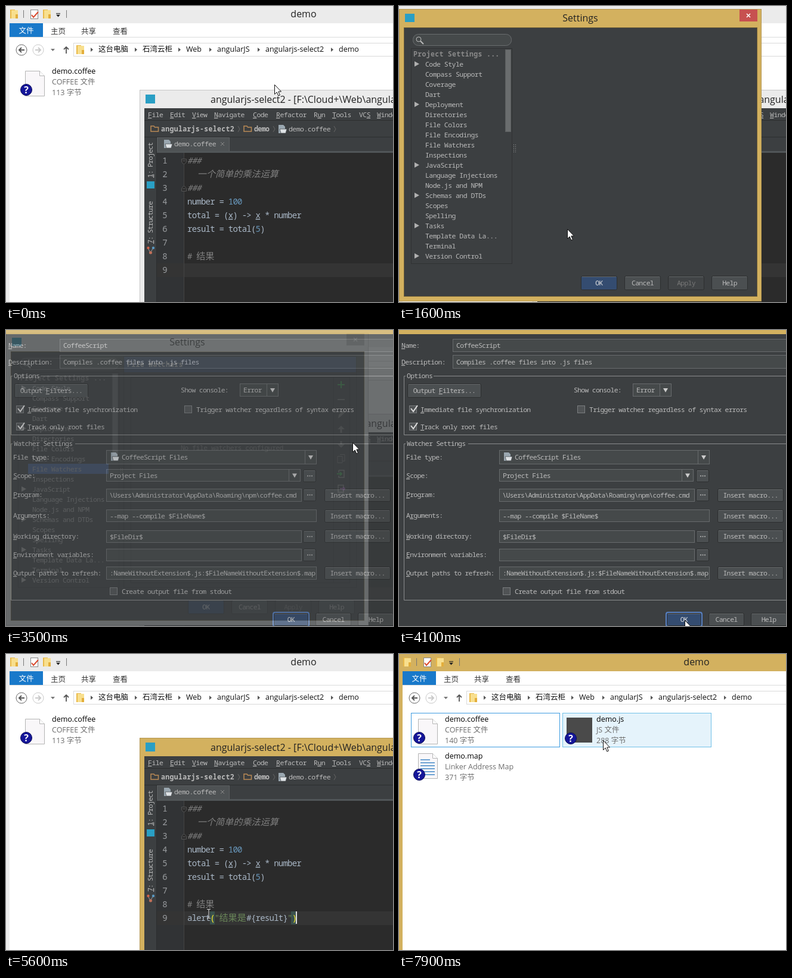
An HTML page that plays this animation: 649x498 px, repeating every 8000 ms.

```html
<!DOCTYPE html>
<html lang="zh">
<head>
<meta charset="utf-8">
<title>demo</title>
<style>
html, body { margin: 0; width: 100%; height: 100%; overflow: hidden; background: #fff }
svg { display: block; width: 649px; height: 498px; user-select: none }
.ui { font: 12.5px "Open Sans", "Noto Sans CJK SC", sans-serif }
.title { font: 16px "Open Sans", sans-serif }
.ide, .wide, .bold, .side { font: 11.5px "Noto Sans Mono", monospace; letter-spacing: -.75px }
.wide { letter-spacing: -.53px }
.side { letter-spacing: -1px }
.bold { font-weight: bold; letter-spacing: .33px }
.key { font-weight: bold }
.code { font: 14px "Noto Sans Mono", monospace; letter-spacing: -.76px }
.han { font: 15.1px "Noto Sans CJK SC", sans-serif }
.italic { font-style: italic }
.u { text-decoration: underline }
</style>
</head>
<body>
<svg id="stage" viewBox="0 0 649 498"></svg>
<script>
const GOLD = '#d3b15f', PALE = '#ebebeb', PANEL = '#3c3f41', FG = '#bbbbbb', DIM = '#777777', BLUE = '#4b6eaf';

const rect = (x, y, w, h, fill, stroke, rx = 0) => {
  const o = stroke ? .5 : 0;
  return `<rect x="${x + o}" y="${y + o}" width="${w - 2 * o}" height="${h - 2 * o}" rx="${rx}" fill="${fill}" stroke="${stroke || 'none'}"/>`;
};
const path = (d, stroke, width = 1, fill = 'none') => `<path d="${d}" fill="${fill}" stroke="${stroke}" stroke-width="${width}"/>`;
const shape = (d, fill) => path(d, 'none', 0, fill);
const disc = (x, y, r, fill, stroke = 'none') => `<circle cx="${x}" cy="${y}" r="${r}" fill="${fill}" stroke="${stroke}"/>`;
// An underscore underlines the character after it.
const text = (x, y, s, fill = FG, cls = 'ide', more = '') => {
  const body = s.replace(/&/g, '&amp;').replace(/</g, '&lt;').replace(/_(.)/g, '<tspan class="u">$1</tspan>');
  return `<text x="${x}" y="${y}" fill="${fill}" class="${cls}" ${more}>${body}</text>`;
};
const middle = 'text-anchor="middle"', end = 'text-anchor="end"';
const layer = (id, ...parts) => `<g id="${id}">${parts.flat().join('')}</g>`;

// File manager
const folder = (x, y) => rect(x, y, 8, 15, '#e9b948') + rect(x + 2, y + 1, 11, 14, '#f8df8e') + rect(x + 9, y + 8, 4, 7, '#e3ae3c');
const page = (x, y) => path(`M${x}.5 ${y}.5h24l8 8v34h-32z`, '#b4b4b4', 1, '#f9f7f9') + path(`M${x + 24}.5 ${y}.5v8h8`, '#b4b4b4', 1, '#fff');
const badge = (x, y) => disc(x, y, 9.5, '#15169a', '#0a0b55') +
  text(x, y + 6, '?', '#fff', 'ui', middle + ' style="font-size:16px;font-weight:bold"');
const fileText = (x, y, name, kind, size) => text(x, y, name, '#000', 'ui') + text(x, y + 18, kind, '#6d6d6d', 'ui') +
  `<g id="size-${name.split('.')[1]}">${text(x, y + 36, size, '#6d6d6d', 'ui')}</g>`;

const crumbs = [[155, '这台电脑'], [229, '石湾云柜'], [302, 'Web'], [354, 'angularJS'], [435, 'angularjs-select2'], [558, 'demo']];
const explorer = layer('explorer',
  rect(0, 0, 649, 498, '#fff'),
  `<path id="explorerFrame" d="M0 0H649V29H6V498H0Z"/>`,
  folder(7, 6), folder(62, 6),
  path('M29.5 7v13M101.5 7v13', '#777'),
  rect(41, 6, 13, 16, '#fff', '#888'), path('M43 15l3 4l8-9', '#d9472b', 2),
  path('M84 12.5h7', '#222'), shape('M84 14.5h7l-3.5 4z', '#222'),
  text(499, 19, 'demo', '#222', 'title', middle),
  rect(6, 29, 56, 23, '#1979ca'), text(34, 46, '文件', '#fff', 'ui', middle),
  [[75, '主页'], [126, '共享'], [179, '查看']].map(([x, s]) => text(x, 47, s, '#333', 'ui')),
  path('M6 52.5H649', '#dadbdc'),
  disc(26, 74, 9, '#fff', '#666'), path('M31 74h-9M26 70l-4 4l4 4', '#555', 2),
  disc(54, 74, 9, '#fff', '#c9c9c9'), path('M49 74h9M54 70l4 4l-4 4', '#c9c9c9', 2),
  shape('M75 72h7l-3.5 4z', '#777'), path('M101 80V69M97 73l4-4l4 4', '#555', 1.8),
  rect(113, 62, 540, 23, '#fff', '#d9d9d9'), folder(118, 66),
  crumbs.map(([x, s]) => shape(`M${x - 13} 70v7l4-3.5z`, '#555') + text(x, 77, s, '#111', 'ui')),
  layer('focus', rect(20, 99, 250, 58, '#fff', '#3c9be0')),
  page(32, 109), badge(34, 141),
  fileText(77, 114, 'demo.coffee', 'COFFEE 文件', '113 字节'),
  layer('newFiles',
    rect(274, 99, 250, 58, '#e5f3fb', '#70c0e7'),
    rect(281, 107, 43, 42, '#4a4a4a'), badge(288, 142),
    fileText(331, 114, 'demo.js', 'JS 文件', '288 字节'),
    page(32, 167), path('M36 178h16M36 183h24M36 188h24M36 193h24M36 198h24M36 203h24', '#3f86c6', 1.5), badge(34, 203),
    fileText(77, 176, 'demo.map', 'Linker Address Map', '371 字节')));

// Editor window
const openFolder = (x, y) => path(`M${x + 1} ${y + 10}v-9h5l1.5 2h6v7z`, '#b98a55', 1.5);
const scriptIcon = (x, y) => shape(`M${x} ${y}h8l3 3v11h-11z`, '#9aa7b0') +
  shape(`M${x + 2} ${y + 7}h12l-2 7h-8z`, '#dfe3e6') + path(`M${x + 2} ${y + 7}h12l-2 7h-8z`, '#4b4f52', .8);
const menuBar = [[238, '_File'], [275, '_Edit'], [312, '_View'], [349, '_Navigate'], [414, '_Code'], [453, '_Refactor'],
  [516, 'R_un'], [547, '_Tools'], [592, 'VC_S'], [622, '_Window']];
const col = n => 304 + 7.64 * n, row = n => 242 + 23 * n;
const code = (c, r, s, fill = '#a9b7c6', cls = 'code') => text(col(c), row(r), s, fill, cls);
const vertical = (y, s) => text(0, 0, s, FG, 'side', `transform="translate(246 ${y}) rotate(-90)"`);

const ide = layer('ide',
  `<rect id="ideFrame" x="224.5" y="141.5" width="440" height="370"/>`,
  rect(234, 149, 16, 15, '#2a9fc4'),
  text(343, 163, 'angularjs-select2 - [F:\\Cloud+\\Web\\angularjs-select2]', '#222', 'title'),
  rect(232, 172, 417, 326, PANEL),
  layer('fileOpen', rect(232, 173, 37, 19, BLUE)),
  menuBar.map(([x, s]) => text(x, 187, s, FG, 'wide')),
  path('M232 192.5H649M232 220.5H649', '#2c2e2f'),
  openFolder(242, 201), text(260, 211, 'angularjs-select2', FG, 'bold'),
  openFolder(398, 201), text(416, 211, 'demo', FG, 'wide key'),
  scriptIcon(457, 200), text(474, 211, 'demo.coffee', FG, 'wide'),
  path('M389 202l3 5l-3 5M448 202l3 5l-3 5M550 202l3 5l-3 5', '#666'),
  rect(253, 221, 122, 24, '#4e5254', '#5d6163'), scriptIcon(265, 225), text(282, 236, 'demo.coffee', FG, 'wide'),
  path('M360 229l6 6m0-6l-6 6', '#888'),
  rect(253, 244, 396, 3, '#515658'),
  path('M252.5 221V498', '#2c2e2f'),
  vertical(289, '_1: Project'), rect(236, 295, 13, 12, '#2a9fc4'),
  vertical(400, '_7: Structure'),
  path('M238 407l4 8l5-8', '#888', 1.2), disc(238.5, 407, 2.2, '#d0624a'), disc(247, 407, 2.2, '#5a97c0'), disc(242.5, 415, 2.5, '#c0705a'),
  rect(253, 247, 396, 251, '#2b2b2b'), rect(253, 247, 45, 251, '#313335'),
  rect(253, 433, 396, 23, '#343434'), path('M298.5 247V498', '#444'),
  [...'123456789'].map((n, i) => text(270, row(i + 1), n, '#9a9da0', 'code', end)),
  path('M294.5 257.5h8v5l-4 4l-4-4zM294.5 311.5h8v-5l-4-4l-4 4zM296 260.5h5M296 307.5h5', '#555', 1, '#2b2b2b'),
  code(0, 1, '###', '#808080', 'code italic'), code(2.2, 2, '一个简单的乘法运算', '#808080', 'han italic'), code(0, 3, '###', '#808080', 'code italic'),
  code(0, 4, 'number ='), code(9, 4, '100', '#6897bb'),
  code(0, 5, 'total = (_x) -> _x * number'),
  code(0, 6, 'result = total('), code(15, 6, '5', '#6897bb'), code(16, 6, ')'),
  code(0, 8, '#', '#808080'), code(2, 8, '结果', '#808080', 'han'),
  layer('alertLine',
    rect(342, 433, 8, 22, '#3b514d'), rect(478, 433, 8, 22, '#3b514d'),
    code(0, 9, 'alert'), code(5, 9, '(', '#ffef28'), code(6, 9, '"', '#6a8759'), code(7, 9, '结果是', '#6a8759', 'han'),
    code(13, 9, '#{result}'), code(22, 9, '"', '#6a8759'), code(23, 9, ')', '#ffef28'),
    rect(486, 433, 2, 21, '#ddd')));

// File menu: centre of row, label, shortcut
const menuRows = [[203, 'New Project...'], [222, '_New...', 'Alt+Insert'], [241, '_Open...'], [260, 'Open URL...'],
  [279, 'New Project from Existing Files...'], [298, 'Save As..', 'Ctrl+Shift+S'], [317, 'Reopen Project'], [336, 'Close Project'],
  [355, 'Rename Project...'], [378, 'Se_ttings...', 'Ctrl+Alt+S'], [397, 'Def_ault Settings...'], [420, '_Import Settings...'],
  [439, '_Export Settings...'], [462, '_Save All', 'Ctrl+S'], [481, 'S_ynchronize', 'Ctrl+Alt+Y'], [500, 'Invalidate Caches / Restart...']];
const menu = layer('menu',
  rect(232, 193, 254, 305, PANEL), path('M485.5 193V498', '#2f3132'),
  `<rect id="menuHover" x="255" width="231" height="19" fill="${BLUE}"/>`,
  path('M232 366.5h254M232 408.5h254M232 451.5h254', '#2a2c2d'),
  menuRows.map(([y, label, key = '']) => text(257, y + 4, label) + text(474, y + 4, key, '#eee', 'ide key', end)),
  shape('M478 313v8l4-4z', FG),
  openFolder(237, 235),
  disc(241, 375, 3, 'none', '#d39a4a'), path('M242 383l7-8M240 376l9 8', '#b0b0b0', 2),
  rect(238, 455, 12, 12, '#c8c8c8'), rect(241, 455, 6, 4, PANEL), rect(240, 462, 8, 5, '#666'),
  path('M239 483a5.5 5.5 0 0 1 8-7M249 479a5.5 5.5 0 0 1-8 7', '#5aa3d0', 2.2));

// Dialog parts
const button = (x, y, w, h, label, fill = '#4b4f51', color = FG) =>
  rect(x, y, w, h, fill, '#2c2e2f', 2) + path(`M${x + 2} ${y + 1.5}h${w - 4}`, '#66696b') + text(x + w / 2, y + h / 2 + 4, label, color, 'ide', middle);
const okButton = (x, y, w, h) => button(x, y, w, h, 'OK', '#344c70', '#e0e0e0');
const check = (x, y, on) => rect(x, y, 13, 13, '#505355', '#7b7e80') + (on ? path(`M${x + 3} ${y + 5}l4 5l7-10`, '#ddd', 2) : '');
const plus = path('M562 86v12M556 92h12', '#3fae4d', 2);

// Settings dialog
const tree = ['>Code Style', 'Compass Support', 'Coverage', 'Dart', '>Deployment', 'Directories', 'File Colors', 'File Encodings',
  'File Watchers', 'Inspections', '>JavaScript', 'Language Injections', 'Node.js and NPM', '>Schemas and DTDs', 'Scopes', 'Spelling',
  '>Tasks', 'Template Data La...', 'Terminal', '>Version Control'];
const settings = layer('settings',
  `<rect id="settingsFrame" x=".5" y="5.5" width="607" height="491"/>`,
  rect(8, 36, 593, 453, PANEL, '#6b5d38'),
  rect(10, 13, 16, 14, '#2a9fc4'),
  text(304, 26, 'Settings', '#222', 'title', middle),
  `<rect id="closeButton" x="571" y="6" width="30" height="20"/>`, path('M583 13l6 6m0-6l-6 6', '#fff', 1.6),
  rect(23, 47, 166, 20, '#45494a', '#6a6d6f', 9), disc(33, 56, 4, 'none', FG), path('M36 59l5 5', FG, 2),
  rect(20, 71, 170, 363, PANEL, '#303233'), text(24, 85, 'Project Settings ...', '#8a8a8a', 'bold'),
  rect(178, 73, 10, 139, '#6a6d6e', '#5b5e5f'),
  layer('treePick', rect(37, 225, 135, 17, BLUE)),
  tree.map((s, i) => {
    const y = 102 + 17 * i;
    return (s[0] === '>' ? shape(`M26 ${y - 9}v9l8-4.5z`, '#b0b0b0') : '') + text(44, y, s.replace('>', ''), FG, 'wide');
  }),
  path('M192.5 233v14M195.5 233v14', '#999', 1).replace('/>', ' stroke-dasharray="1 2"/>'),
  okButton(305, 454, 61, 24), button(378, 454, 61, 24, 'Cancel'), button(451, 454, 61, 24, 'Apply', '#414446', DIM), button(524, 454, 61, 24, 'Help'),
  layer('watchers',
    rect(197, 44, 391, 390, PANEL, '#303233'), rect(198, 45, 389, 26, '#3f5070'), text(203, 62, 'File Watchers', '#ccc', 'bold'),
    rect(209, 79, 368, 347, PANEL, '#2f3132'), path('M549.5 80V425', '#2f3132'),
    plus, path('M556 117h12', '#777', 2),
    path('M558 147l1-4l7-7l2 2l-7 7z', '#777', 1.5, '#777'),
    path('M562 173v-10M562 187v10', '#777', 3), shape('M556 167h12l-6-6zM556 192h12l-6 6z', '#777'),
    path('M556 212.5h8v11h-8zM560 209.5h8v11h-4', '#777'),
    path('M558 236h9v12h-9v-3m0-5v-4', '#8b8b8b', 1.5), path('M555 242h8M560 239l3 3l-3 3', '#3fae4d', 2),
    path('M566 264v-3h-9v12h9v-3', '#8b8b8b', 1.5), path('M560 267h8M565 264l3 3l-3 3', '#a970c0', 2)),
  layer('emptyNote', text(379, 202, 'No file watchers configured', '#888', 'wide', middle)),
  layer('added',
    check(215, 85, true), text(235, 96, 'CoffeeScript', FG, 'wide'), text(545, 60, 'Reset', '#589df6', 'bold'),
    button(451, 454, 61, 24, '_Apply')));

const kinds = ['<custom>', 'Closure Compiler', 'CSSO', 'CoffeeScript', 'Compass Sass', 'Compass SCSS', 'Haml', 'Jade', 'Less', 'Sass',
  'SCSS', 'Stylus', 'Traceur', 'TypeScript', 'UglifyJS', 'YUI Compressor', 'YUI CSS'];
const popup = layer('popup',
  rect(555, 104, 140, 394, PANEL, '#5f6263'),
  `<rect id="popupHover" x="556" width="93" height="23" fill="${BLUE}"/>`,
  kinds.map((s, i) => text(562, 120 + 23 * i, s, FG, 'wide')));

// New watcher dialog
const field = (x, y, w, h, s = '') => rect(x, y, w, h, '#45494a', '#686b6d') + text(x + 6, y + h / 2 + 4, s);
const combo = (x, y, w, h, s, split = 20) => field(x, y, w, h, s) + path(`M${x + w - split + .5} ${y}v${h}`, '#686b6d') +
  shape(`M${x + w - split / 2 - 4} ${y + h / 2 - 3}h8l-4 7z`, '#ccc');
const dots = y => button(498, y, 22, 21, '') + path(`M505 ${y + 10.5}h9`, FG, 1.5).replace('/>', ' stroke-dasharray="2 1.5"/>');
const labels = [[30, 4, '_Name:'], [58, 4, '_Description:'], [81, 13, 'Options'], [195, 13, 'Watcher Settings'], [218, 12, 'File t_ype:'],
  [249, 12, '_Scope:'], [281, 12, '_Program:'], [316, 12, 'A_rguments:'], [351, 12, '_Working directory:'], [382, 12, '_Environment variables:'],
  [413, 12, '_Output paths to refresh:'], [138, 36, '_Immediate file synchronization'], [167, 36, '_Track only root files'],
  [138, 319, 'Trigger watcher regardless of syntax errors'], [105, 293, 'Show console:'], [444, 194, 'Create output file from stdout']];
const watcher = layer('watcher',
  rect(0, 0, 649, 498, PANEL), rect(0, 0, 649, 7, GOLD),
  path('M58 77.5H649M11 77.5H8.5V176.5H649M116 191.5H649M11 191.5H8.5V454.5H649', '#8b8d8e'),
  labels.map(([y, x, s]) => text(x, y, s)),
  field(90, 15, 600, 22, 'CoffeeScript'), field(90, 42, 600, 23, 'Compiles .coffee files into .js files'),
  button(14, 90, 124, 24, 'Output _Filters...'), combo(392, 90, 65, 22, 'Error'),
  check(17, 127, true), check(17, 156, true), check(299, 127), check(174, 433),
  combo(168, 202, 353, 24, ''), scriptIcon(176, 206), text(194, 218, 'CoffeeScript Files'),
  combo(168, 234, 326, 21, 'Project Files'),
  field(168, 267, 328, 22), text(487, 282, '\\Users\\Administrator\\AppData\\Roaming\\npm\\coffee.cmd', FG, 'ide', end),
  field(168, 302, 353, 21, '--map --compile $FileName$'),
  field(168, 337, 328, 21, '$FileDir$'), field(168, 368, 328, 21),
  field(168, 398, 353, 22, ':NameWithoutExtension$.js:$FileNameWithoutExtension$.map'),
  [235, 267, 337, 368].map(dots),
  [267, 302, 336, 398].map(y => button(534, y, 111, 22, 'Insert macro...')),
  rect(447, 474, 62, 26, '#5781c4', '#5781c4', 3), okButton(449, 476, 58, 22), button(519, 476, 60, 22, 'Cancel'), button(590, 476, 60, 22, 'Help'));

const pointer = layer('pointer',
  layer('arrow', path('M.5 .5V16.5L4.2 13L6.8 19L9.4 18L6.8 12H11.5Z', '#111', 1, '#fff')),
  layer('beam', path('M-3 -7.5h2.5l.5 1l.5-1h2.5M0 -7V7M-3 7.5h2.5l.5-1l.5 1h2.5', '#ddd')));

const stage = document.getElementById('stage');
stage.innerHTML = [explorer, ide, menu, settings, popup, watcher, pointer].join('');

const el = id => document.getElementById(id);
const show = (id, v) => el(id).setAttribute('opacity', +v);
const fill = (id, color) => el(id).setAttribute('fill', color);
const frame = (id, active) => {
  fill(id, active ? GOLD : PALE);
  el(id).setAttribute('stroke', active ? '#b4964f' : '#c6c6c6');
};
const ramp = (t, a, b) => Math.min(1, Math.max(0, (t - a) / (b - a)));
const within = (t, a, b) => t >= a && t < b;

// Pointer path: time, x, y
const route = [[0, 450, 132], [300, 243, 187], [500, 243, 187], [1000, 282, 375], [1600, 282, 375], [1800, 100, 233], [1900, 100, 233],
  [2100, 480, 140], [2300, 562, 90], [2600, 562, 90], [3000, 574, 176], [3100, 581, 189], [3500, 581, 189], [4100, 479, 488],
  [4500, 479, 488], [4800, 337, 464], [5000, 337, 464], [5300, 340, 437], [5800, 340, 437], [6200, 197, 319], [6400, 197, 319],
  [6700, 197, 359], [6800, 197, 359], [7100, 342, 145], [8000, 342, 145]];
const pointerAt = t => {
  const i = route.findIndex(k => k[0] > t), [t0, x0, y0] = route[i - 1], [t1, x1, y1] = route[i], p = (t - t0) / (t1 - t0);
  return [x0 + (x1 - x0) * p, y0 + (y1 - y0) * p];
};

function draw(now) {
  const t = Math.floor(now % 8000 / 100) * 100;
  const [x, y] = pointerAt(t);
  const menuOpen = within(t, 400, 1300), front = t >= 6400, settingsActive = !within(t, 3300, 4300);

  fill('explorerFrame', front ? GOLD : PALE);
  frame('ideFrame', within(t, 200, 1400) || t >= 4900);
  frame('settingsFrame', settingsActive);
  fill('closeButton', settingsActive ? '#c75050' : '#bcbcbc');
  show('focus', front);
  show('newFiles', ramp(t, 7500, 7900));
  el('size-coffee').firstChild.textContent = (t < 6900 ? 113 : 140) + ' 字节';

  show('ide', !front);
  show('fileOpen', menuOpen);
  show('alertLine', t >= 5500);
  show('menu', menuOpen);
  const hit = menuRows.find(r => Math.abs(r[0] - y) <= 9.5);
  show('menuHover', !!hit);
  if (hit) el('menuHover').setAttribute('y', hit[0] - 10);

  show('settings', ramp(t, 1200, 1500) * (1 - ramp(t, 4800, 5100)));
  show('treePick', t >= 1800);
  show('watchers', t >= 1900);
  show('emptyNote', within(t, 1900, 4200));
  show('added', t >= 4200);
  show('popup', within(t, 2500, 3300));
  const item = Math.floor((y - 104) / 23);
  show('popupHover', item >= 0);
  el('popupHover').setAttribute('y', 104 + 23 * item);
  show('watcher', ramp(t, 3200, 3600) * (1 - ramp(t, 4100, 4400)));

  const editing = within(t, 5100, 6400) && x > 298;
  show('arrow', !editing);
  show('beam', editing);
  el('pointer').setAttribute('transform', `translate(${Math.round(x)} ${Math.round(y)})`);
}

const start = performance.now();
const tick = () => { draw(performance.now() - start); requestAnimationFrame(tick); };
tick();
</script>
</body>
</html>
```
